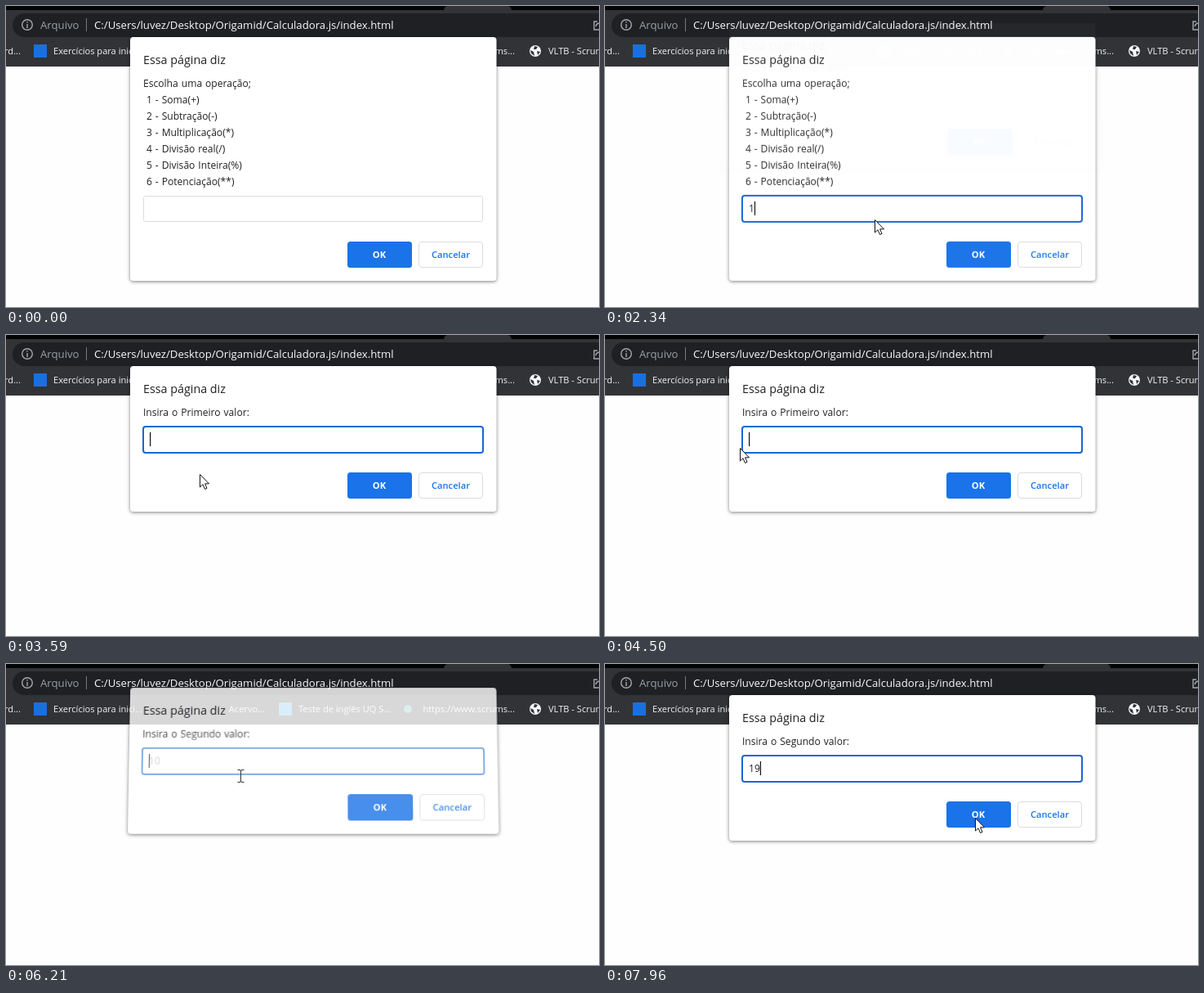
Animation of 726 by 368 pixels, one loop 8 s. Source, as an HTML page:

```html
<!DOCTYPE html>
<html lang="pt">
<head>
<meta charset="utf-8">
<style>
  html, body { margin: 0; width: 100%; height: 100%; overflow: hidden; background: #fefefe; }
  svg { position: absolute; left: 0; top: 0; width: 726px; height: 368px; }
  text { font-family: "Open Sans", "Noto Sans", sans-serif; font-size: 12.1px; fill: #202124; white-space: pre; }
  .line { word-spacing: .8px; }
  .bookmark { font-size: 11.1px; fill: #f1f3f4; }
  .url { font-size: 13.2px; fill: #f8f9fa; }
  .title { font-size: 14.3px; }
  .button { font-size: 11.2px; font-weight: 600; text-anchor: middle; }
  .dialog { will-change: transform; }
  .panel { filter: drop-shadow(0 1px 2px rgba(0, 0, 0, .5)); }
</style>
</head>
<body>
<svg id="browser" viewBox="0 0 726 368">
  <rect width="726" height="74" fill="#323337"/>
  <path d="M0 0H541Q537 0 536 5H0ZM614 0H726V5H619Q618 0 614 0Z" fill="#040405"/>
  <rect x="8" y="9" width="740" height="29" rx="14.5" fill="#1f2023"/>
  <g fill="none" stroke="#a4a8ad" stroke-width="1.4">
    <circle cx="26" cy="23" r="6.3"/>
    <path d="M26 22V27M26 19V20.5"/>
    <path d="M724 19H720V29H726M722 25Q723 21 727 21"/>
  </g>
  <text class="url" x="42" y="28" style="fill:#9aa0a6">Arquivo</text>
  <path d="M98.5 15V31" stroke="#77797d"/>
  <text class="url" x="108" y="28">C:/Users/luvez/Desktop/Origamid/Calculadora.js/index.html</text>

  <text class="bookmark" x="18" y="59" text-anchor="end">rd...</text>
  <rect x="34" y="47" width="16" height="16" fill="#1a6fe0"/>
  <text class="bookmark" x="58" y="59">Exercícios para inici...</text>
  <text class="bookmark" x="317" y="59" text-anchor="end">Acervo...</text>
  <rect x="334" y="47" width="16" height="16" fill="#38a8e8"/>
  <text class="bookmark" x="358" y="59">Teste de inglês UQ S...</text>
  <circle cx="492" cy="55" r="5" fill="#45a8a0"/>
  <text class="bookmark" x="623" y="59" text-anchor="end">https://www.scrums...</text>
  <circle cx="648" cy="55" r="7" fill="#f8f9fa"/>
  <path d="M642 54L646 56L647 61L643 58ZM647 49L651 50L649 53L646 53ZM650 55L654 56L651 60Z" fill="#323337"/>
  <text class="bookmark" x="664" y="59">VLTB - Scrum</text>
</svg>

<svg id="pointer" viewBox="0 0 726 368" style="z-index:2">
  <path id="arrow" d="M.5 .5V16L4 12.7L6.5 18.5L9 17.4L6.6 11.8H11.5Z" fill="#fff" stroke="#111" stroke-linejoin="round"/>
  <path id="beam" d="M-3.5 -7.5H-1Q.5 -7.5 .5 -6Q.5 -7.5 2 -7.5H4.5M.5 -6.5V7M-3.5 7.5H-1Q.5 7.5 .5 6Q.5 7.5 2 7.5H4.5" fill="none" stroke="#333"/>
</svg>

<script>
const LOOP = 8000, FADE = 120;

const operations = ["Escolha uma operação;", " 1 - Soma(+)", " 2 - Subtração(-)", " 3 - Multiplicação(*)",
  " 4 - Divisão real(/)", " 5 - Divisão Inteira(%)", " 6 - Potenciação(**)"];

// typed: [time, field text]; blinks: times at which the caret cycle restarts
const dialogs = [
  { lines: operations, open: -FADE, close: 2340, focus: 90, typed: [[1790, "1"]], blinks: [40] },
  { lines: ["Insira o Primeiro valor:"], open: 2340, close: 6150, focus: 2340,
    typed: [[5090, "1"], [5250, "10"]], blinks: [2420, 5090, 5250] },
  { lines: ["Insira o Segundo valor:"], open: 6150, close: 9000, focus: 6150,
    typed: [[7200, "1"], [7500, "19"]], blinks: [6000, 7200, 7500] }
];

const pointerPath = [[90, 330, 261], [3420, 330, 261], [3590, 237, 170], [4170, 161, 131], [4290, 165, 138],
  [4500, 165, 138], [5250, 445, 193], [5650, 445, 193], [6210, 287, 137], [6450, 230, 134],
  [7520, 230, 134], [7900, 453, 188], [8000, 453, 188]];

const byId = id => document.getElementById(id);
const clamp = v => Math.max(0, Math.min(1, v));

function buildDialog(d) {
  const extra = (d.lines.length - 1) * 20;
  const field = 112 + extra, buttons = 168 + extra, height = 178 + extra;
  const svg = document.createElementNS("http://www.w3.org/2000/svg", "svg");
  svg.setAttribute("viewBox", "0 0 726 368");
  svg.setAttribute("class", "dialog");
  svg.style.transformOrigin = `376px ${38 + height / 2}px`;
  svg.innerHTML = `
    <rect class="panel" x="152" y="38" width="448.5" height="${height}" rx="4" fill="#fff"/>
    <text class="title" x="168" y="71">Essa página diz</text>
    ${d.lines.map((line, i) => `<text class="line" x="168" y="${99 + i * 20}">${line}</text>`).join("")}
    <rect x="168.5" y="${field + .5}" width="415" height="31" rx="2" fill="#fff" stroke="#dadce0"/>
    <rect class="ring" x="168" y="${field}" width="416" height="32" rx="3" fill="none" stroke="#1967d2" stroke-width="2"/>
    <text class="value" x="176" y="${field + 20}"></text>
    <rect class="caret" y="${field + 7}" width="1.2" height="17" fill="#111"/>
    <rect x="418" y="${buttons}" width="79" height="32" rx="3.5" fill="#1a73e8"/>
    <text class="button" x="457" y="${buttons + 20}" style="fill:#fff;font-weight:700">OK</text>
    <rect x="505.5" y="${buttons + .5}" width="78" height="31" rx="3.5" fill="none" stroke="#dadce0"/>
    <text class="button" x="544.5" y="${buttons + 20}" style="fill:#1a73e8">Cancelar</text>`;
  document.body.append(svg);
  d.svg = svg;
  for (const part of ["ring", "value", "caret"]) d[part] = svg.querySelector("." + part);
}

function caretOpacity(t, blinks) {
  const start = blinks.filter(b => b <= t).pop();
  if (start === undefined) return 0;
  const u = (t - start) % 1000;
  return u < 500 ? clamp(u / 40) : clamp(1 - (u - 500) / 130);
}

function drawDialog(d, t) {
  const entering = clamp((t - d.open) / FADE), leaving = clamp((t - d.close) / FADE);
  const visible = entering > 0 && leaving < 1;
  d.svg.style.display = visible ? "" : "none";
  if (!visible) return;
  const tilt = 1 - entering + leaving;
  d.svg.style.opacity = entering ** .7 * (1 - leaving);
  d.svg.style.transform = tilt
    ? `translateY(${-18.5 * tilt}px) perspective(1000px) rotateX(${9 * tilt}deg) scale(${1 + .012 * tilt})`
    : "none";
  const entry = d.typed.filter(([at]) => at <= t).pop();
  d.value.textContent = entry ? entry[1] : "";
  d.ring.style.opacity = clamp((t - d.focus) / FADE);
  d.caret.setAttribute("x", 176 + (entry ? d.value.getComputedTextLength() : 0));
  d.caret.style.opacity = caretOpacity(t, d.blinks);
}

function drawPointer(t) {
  byId("pointer").style.display = t < pointerPath[0][0] ? "none" : "";
  const next = Math.max(1, pointerPath.findIndex(([at]) => at > t));
  const [t0, x0, y0] = pointerPath[next - 1], [t1, x1, y1] = pointerPath[next];
  const p = clamp((t - t0) / (t1 - t0)), ease = p * p * (3 - 2 * p);
  const x = Math.round(x0 + (x1 - x0) * ease), y = Math.round(y0 + (y1 - y0) * ease);
  const overField = t < 1790 || (x > 167 && x < 585 && y > 111 && y < 145);
  byId("beam").style.display = overField ? "" : "none";
  byId("arrow").style.display = overField ? "none" : "";
  for (const id of ["beam", "arrow"]) byId(id).setAttribute("transform", `translate(${x} ${y})`);
}

function frame() {
  const t = performance.now() % LOOP;
  dialogs.forEach(d => drawDialog(d, t));
  drawPointer(t);
  requestAnimationFrame(frame);
}

dialogs.forEach(buildDialog);
frame();
</script>
</body>
</html>
```
